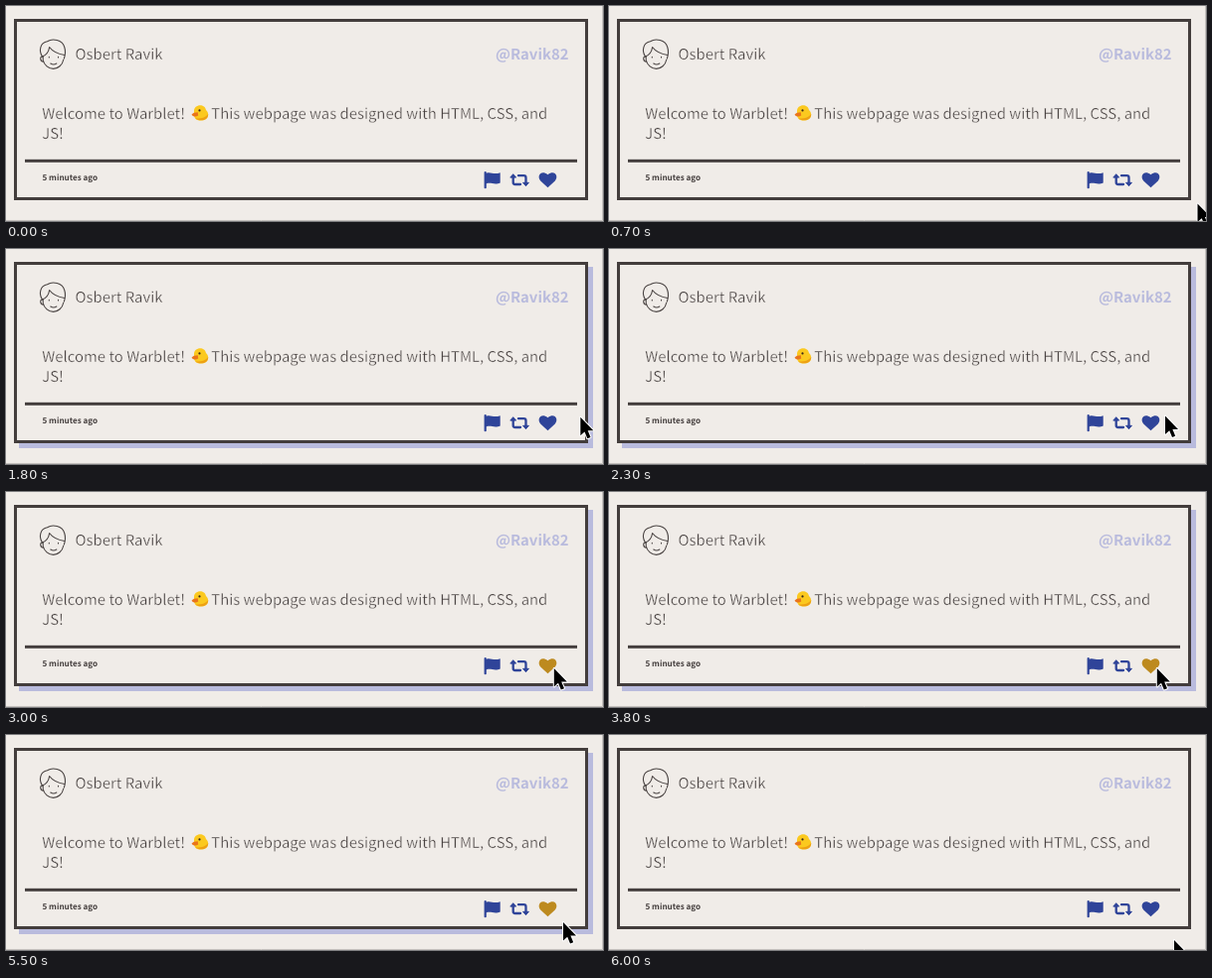
Write an HTML page that moves like this. It is 600 px wide and 217 px high and loops after 6.1 s.

```html
<!DOCTYPE html>
<html lang="en">
<head>
<meta charset="utf-8">
<title>Post card</title>
<style>
  html, body { margin: 0; width: 100%; height: 100%; overflow: hidden; background: #f0ece8; }
  svg { display: block; width: 600px; height: 217px; }
  text {
    font: 300 14.88px "Noto Sans CJK JP", "Noto Sans CJK SC", "Noto Sans CJK KR", "Noto Sans CJK", "Open Sans", sans-serif;
    fill: #433d3c;
    text-rendering: geometricPrecision;
  }
  /* a background-coloured outline thins the regular weight to a light one */
  .light { stroke: #f0ece8; stroke-width: .36; }
  .handle { font-weight: 700; fill: #b9bbdd; text-anchor: end; }
  .time { font-size: 8.1px; font-weight: 700; }
  .line { fill: none; stroke: #4a4443; stroke-width: 1.1; stroke-linecap: round; stroke-linejoin: round; }
  .icon { fill: #2f4499; }
</style>
</head>
<body>
<svg viewBox="0 0 600 217">
  <rect width="600" height="217" fill="#f0ece8"/>
  <path d="M599.5 0V216.5H0" fill="none" stroke="#c6c2bf"/>

  <rect id="shadow" x="13" y="18" width="577" height="183" fill="#b9bbdd"/>
  <rect x="9.5" y="14.5" width="574" height="180" fill="#f0ece8" stroke="#433d3c" stroke-width="3"/>
  <rect x="19" y="154.8" width="555" height="3" fill="#433d3c"/>

  <!-- avatar -->
  <g class="line">
    <path d="M36.5 51C32.5 45 34.5 37 41.5 35.8C47 32 56.5 34.5 58.6 41C60 45 59.6 49 58.4 53"/>
    <path d="M36.5 51C40.5 49.5 43 46 43.6 41.5C47 46 52.5 48.5 58.8 49.5"/>
    <path d="M37.2 51V54.5C38.2 59.5 43 63.4 47.6 63.4S56.8 59.5 57.8 54"/>
    <path d="M36.8 51.2C33.6 50.5 34.2 56 37.6 56.2"/>
    <path d="M43.3 51.3v.6M52.5 51.3v.6M44.8 58q3 2 6 0"/>
  </g>

  <text class="light" x="69.5" y="54.3">Osbert Ravik</text>
  <text class="handle" x="565.5" y="54.3">@Ravik82</text>
  <text class="light" x="36.3" y="114">Welcome to Warblet!</text>
  <text class="light" x="206.3" y="114">This webpage was designed with HTML, CSS, and</text>
  <text class="light" x="36.3" y="134">JS!</text>
  <text class="time" x="36.5" y="175.5">5 minutes ago</text>

  <!-- chick -->
  <path d="M189 106.500C188.500 98.800 200 98 201 105C204.500 107.500 204.500 115.600 196 115.600C190 115.600 188.200 112 189 106.500Z" fill="#fbc91f"/>
  <path d="M203.200 109C203.500 116 194 116.800 190.200 113.200C195 114 200.500 113 203.200 109Z" fill="#eda014"/>
  <path d="M192.800 107.200C190 107.200 188 108 186.600 109.400C187.600 111.800 191 112 193.200 110.600Z" fill="#e9741c"/>
  <circle cx="194.500" cy="105.400" r="1.1" fill="#3a2a18"/>

  <!-- actions -->
  <path class="icon" d="M480.600 168q0-1 1.100-1t1.100 1v.7C487 167 490 170.600 496.700 168.200V178.400C491 181 487.500 177.600 482.800 179.200V183.500q0 .8-1.100 .8t-1.100-.8Z"/>
  <g class="icon" stroke="#2f4499" stroke-linejoin="round">
    <path d="M509.700 172V178q0 2 2 2H517M515 171.200H520.500q2 0 2 2V179" fill="none" stroke-width="2.300" stroke-linecap="round"/>
    <path d="M509.700 169.700l2.900 3.400h-5.800zM522.500 181.700l2.900-3.400h-5.800z"/>
  </g>
  <path id="heart" d="M544.500 183.300L537.200 176.400C533.200 172 537.500 164.800 544.500 170.200C551.500 164.800 555.800 172 551.800 176.400Z"/>

  <path id="cursor" d="M1 2V20.500L5.200 16.700L8 23.500L11.200 22.200L8.400 15.500H14Z" fill="#000" stroke="#fff" stroke-width="2" stroke-linejoin="round" paint-order="stroke"/>
</svg>
<script>
  const LOOP = 6100, STEP = 100;
  const [shadow, heart, cursor] = ["shadow", "heart", "cursor"].map(id => document.getElementById(id));

  // pointer path: time, x, y
  const path = [
    [400, 597, 214], [1000, 584, 181], [1200, 582.5, 169], [1700, 580, 168],
    [2300, 558, 166.5], [2500, 557, 168], [2800, 549.8, 176], [5100, 549.8, 176],
    [5500, 559, 187], [5800, 562, 195], [6000, 567, 205], [6100, 569, 211]
  ];

  function pointerAt(t) {
    const i = path.findIndex(p => p[0] > t);
    const [t0, x0, y0] = path[i - 1], [t1, x1, y1] = path[i];
    const k = (t - t0) / (t1 - t0);
    return [x0 + (x1 - x0) * k, y0 + (y1 - y0) * k];
  }

  const show = (el, on) => el.setAttribute("visibility", on ? "visible" : "hidden");

  function draw(now) {
    const t = Math.floor(now % LOOP / STEP) * STEP;
    const inside = t >= 400;
    show(cursor, inside);
    if (inside) cursor.setAttribute("transform", `translate(${pointerAt(t)})`);
    show(shadow, t >= 1000 && t < 5900);
    heart.setAttribute("fill", t >= 2800 && t < 5900 ? "#bd8a1f" : "#2f4499");
  }

  const start = performance.now();
  function frame() {
    draw(performance.now() - start);
    requestAnimationFrame(frame);
  }
  frame();
</script>
</body>
</html>
```
